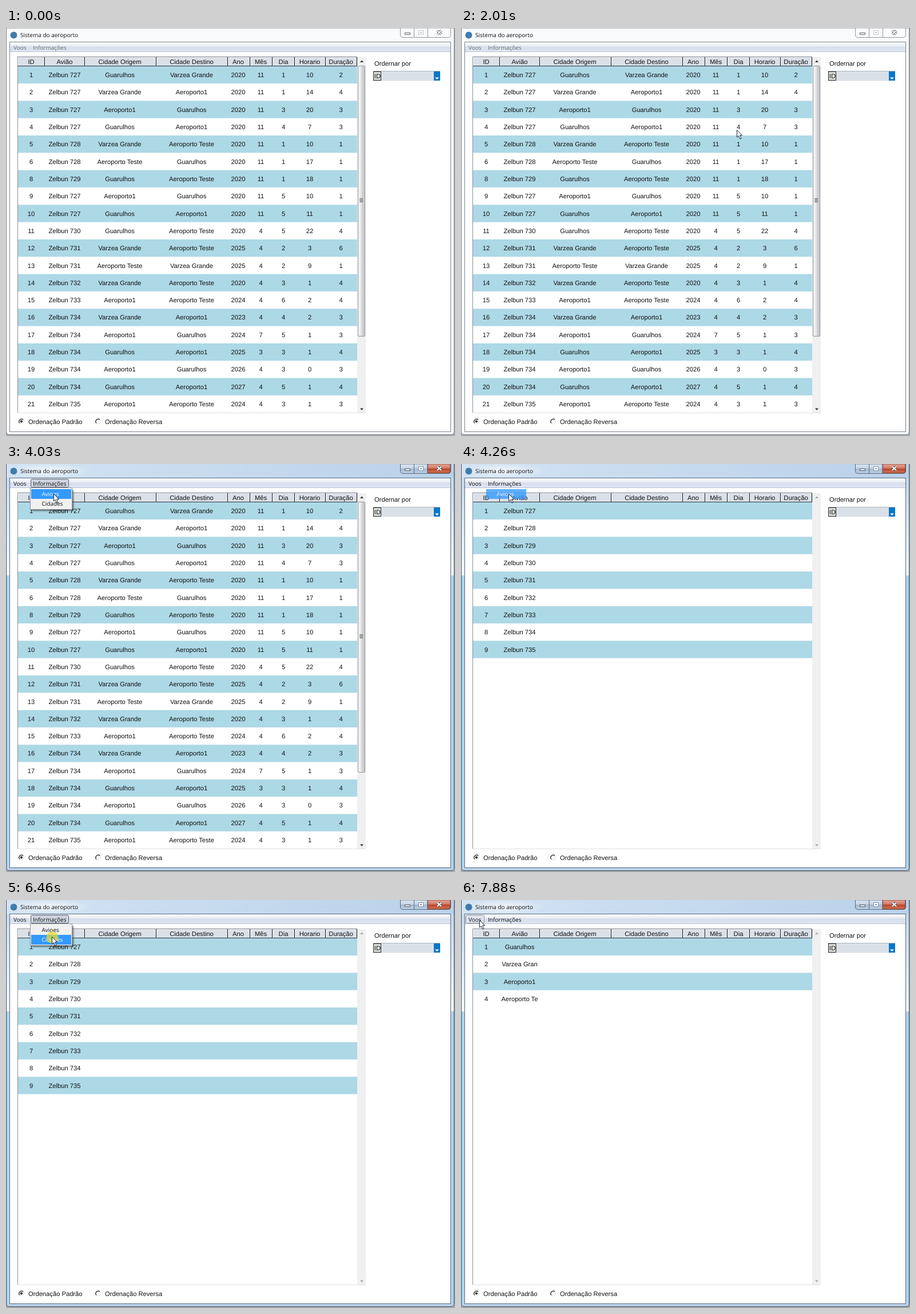
Animation, 785 px wide and 714 px high, one loop 8000 ms. Source, as an HTML page:

```html
<!DOCTYPE html>
<html lang="pt">
<head>
<meta charset="utf-8">
<title>Sistema do aeroporto</title>
<style>
html, body { margin: 0; width: 100%; height: 100%; overflow: hidden; background: #a4a9ae; }
svg { display: block; width: 785px; height: 714px; }
rect { shape-rendering: crispEdges; }
.round { shape-rendering: auto; }
text { font: 11.2px "Liberation Sans", Arial, sans-serif; fill: #111; text-rendering: geometricPrecision; }
.mid { text-anchor: middle; }
.ui { font: 10px "Open Sans", "Noto Sans", sans-serif; }
.timed { animation: 8s step-end infinite; }
</style>
</head>
<body>
<svg id="stage" viewBox="0 0 785 714">
  <defs>
    <linearGradient id="glass">
      <stop offset="0" stop-color="#d3e3f3"/><stop offset="1" stop-color="#b9d1ea"/>
    </linearGradient>
    <linearGradient id="side" x2="0" y2="1">
      <stop offset="0" stop-color="#c6d9ed"/><stop offset="1" stop-color="#f2f7fc"/>
    </linearGradient>
    <linearGradient id="bar" x2="0" y2="1">
      <stop offset="0" stop-color="#fff"/><stop offset=".45" stop-color="#e6ebf4"/>
      <stop offset=".5" stop-color="#d6ddeb"/><stop offset="1" stop-color="#e0e6f3"/>
    </linearGradient>
    <linearGradient id="button" x2="0" y2="1">
      <stop offset="0" stop-color="#dce7f3"/><stop offset=".48" stop-color="#c3d3e5"/>
      <stop offset=".5" stop-color="#a4b9d0"/><stop offset="1" stop-color="#bed2e8"/>
    </linearGradient>
    <linearGradient id="red" x2="0" y2="1">
      <stop offset="0" stop-color="#e6a595"/><stop offset=".48" stop-color="#d07863"/>
      <stop offset=".5" stop-color="#b8412a"/><stop offset="1" stop-color="#d4744f"/>
    </linearGradient>
    <linearGradient id="thumb">
      <stop offset="0" stop-color="#f6f6f6"/><stop offset=".48" stop-color="#e6e6e8"/>
      <stop offset=".55" stop-color="#d3d4d7"/><stop offset="1" stop-color="#c5c6ca"/>
    </linearGradient>
    <radialGradient id="glow">
      <stop offset="0" stop-color="#fff" stop-opacity=".75"/><stop offset="1" stop-color="#fff" stop-opacity="0"/>
    </radialGradient>
  </defs>
</svg>
<script>
const LOOP = 8000;
const css = [];
let timedCount = 0;

const rect = (x, y, w, h, fill, extra = '') =>
  `<rect x="${x}" y="${y}" width="${w}" height="${h}" fill="${fill}" ${extra}/>`;
const box = (x, y, w, h, fill, stroke, r = 0) =>
  rect(x + .5, y + .5, w - 1, h - 1, fill, `stroke="${stroke}" rx="${r}" class="round"`);
const path = (d, fill, stroke = 'none', extra = '') =>
  `<path d="${d}" fill="${fill}" stroke="${stroke}" ${extra}/>`;
const label = (x, y, str, cls = '', fill = '#111') =>
  `<text x="${x}" y="${y}" class="${cls}" style="fill:${fill}">${str}</text>`;

// Group whose style jumps at the given [ms, declarations] marks.
function timed(marks, content) {
  const name = 'k' + timedCount++;
  const frames = marks.map(([ms, rule]) => `${ms / LOOP * 100}%{${rule}}`).join('');
  css.push(`@keyframes ${name}{${frames}}`);
  return `<g class="timed" style="animation-name:${name}">${content}</g>`;
}

// Group visible only during the given [start, end] spans.
function shown(spans, content) {
  const marks = [];
  if (spans[0][0] > 0) marks.push([0, 'visibility:hidden']);
  for (const [start, end] of spans) {
    marks.push([start, 'visibility:visible']);
    marks.push([end, end < LOOP ? 'visibility:hidden' : 'visibility:visible']);
  }
  return timed(marks, content);
}

function windowFrame(active) {
  const line = active ? '#46525f' : '#7b8085';
  const buttonLine = active ? '#56687c' : '#8f979f';
  const glyph = active ? '#fff' : '#fafafa';
  const edge = active ? '#4b5664' : '#62666b';
  const button = active ? 'url(#button)' : '#fbfcfd';
  let out = path('M.5 0V706Q.5 711.5 6 711.5H778Q783.5 711.5 783.5 706V0Z', active ? '#bcd3ea' : '#fafbfc', line);
  if (active) {
    out += rect(1, 0, 782, 25, 'url(#glass)');
    for (const x of [1, 778]) out += rect(x, 25, 5, 170, 'url(#side)');
    for (const x of [1, 781]) out += rect(x, 195, 2, 511, '#8fd3f0');
    out += `<ellipse cx="76" cy="12" rx="72" ry="13" fill="url(#glow)"/>`;
  }
  out += path('M689.5 0V12Q689.5 16.5 694 16.5H773Q777.5 16.5 777.5 12V0Z', button, buttonLine);
  if (active) out += path('M737 0H777V12Q777 16 773 16H737Z', 'url(#red)', '#71372e');
  out += path('M713.5 0V16M737.5 0V16', 'none', buttonLine);
  out += rect(697.5, 8.5, 9, 3, glyph, `stroke="${edge}"`);
  const faint = active ? '#8296ad' : '#c3c8cd';
  out += rect(721.5, 4.5, 8, 7, glyph, `stroke="${faint}"`) + rect(724, 7, 3, 2, faint);
  const cross = 'M754 4.5L761 11M761 4.5L754 11';
  out += path(cross, 'none', edge, 'stroke-width="4"') + path(cross, 'none', glyph, 'stroke-width="2"');
  out += box(6, 24, 772, 683, '#fff', active ? '#56697e' : '#7d848c');
  out += rect(7, 25, 770, 16, 'url(#bar)') + rect(7, 41, 770, 1, '#bac2d1');
  return out;
}

const menuTitles = fill => label(13, 37.5, 'Voos', 'ui', fill) + label(47, 37.5, 'Informações', 'ui', fill);

const columns = [20, 67, 137, 262, 387, 426, 465, 504, 558, 613];
const centers = [44, 102.5, 199, 324.5, 406, 445.5, 485, 531, 585.5];
const titles = ['ID', 'Avião', 'Cidade Origem', 'Cidade Destino', 'Ano', 'Mês', 'Dia', 'Horario', 'Duração'];
const cities = { G: 'Guarulhos', V: 'Varzea Grande', A: 'Aeroporto1', T: 'Aeroporto Teste' };
const plane = number => 'Zelbun ' + number;

const ROW = 30.32;
const table = rows => rows.map((cells, i) =>
  (i % 2 ? '' : rect(21, 66.8 + ROW * i, 593, ROW, '#add8e6', 'class="round"')) +
  cells.map((cell, c) => label(centers[c], 86 + ROW * i, cell, 'mid')).join('')
).join('');

const flights = `727 G V 2020 11 1 10 2
727 V A 2020 11 1 14 4
727 A G 2020 11 3 20 3
727 G A 2020 11 4 7 3
728 V T 2020 11 1 10 1
728 T G 2020 11 1 17 1
729 G T 2020 11 1 18 1
727 A G 2020 11 5 10 1
727 G A 2020 11 5 11 1
730 G T 2020 4 5 22 4
731 V T 2025 4 2 3 6
731 T V 2025 4 2 9 1
732 V T 2020 4 3 1 4
733 A T 2024 4 6 2 4
734 V A 2023 4 4 2 3
734 A G 2024 7 5 1 3
734 G A 2025 3 3 1 4
734 A G 2026 4 3 0 3
734 G A 2027 4 5 1 4
735 A T 2024 4 3 1 3`.split('\n').map((line, i) => {
  const [number, from, to, ...rest] = line.split(' ');
  return [i < 6 ? i + 1 : i + 2, plane(number), cities[from], cities[to], ...rest];
});
const planes = Array.from({ length: 9 }, (_, i) => [i + 1, plane(727 + i)]);
const cityRows = Object.values(cities).map((city, i) => [i + 1, i % 2 ? city.slice(0, i > 2 ? 12 : 11) : city]);

function tableFrame() {
  let out = rect(20, 50, 594, 1, '#777c84') + rect(20, 50, 1, 624, '#8b9097') + rect(20, 673, 609, 1, '#dcdfe3');
  titles.forEach((title, i) => {
    const x = columns[i] + 1, w = columns[i + 1] - columns[i];
    out += rect(x, 51, w, 15, '#dae0e8') + rect(x, 51, w, 1, '#f7f9fb') + rect(x, 51, 1, 15, '#f7f9fb');
    out += rect(x, 66, w, 1, '#111') + rect(x + w - 1, 51, 1, 16, '#111');
    out += label(centers[i], 63, title, 'mid');
  });
  return out + rect(614, 51, 15, 622, '#f0f0f0');
}

const arrows = fill => path('M619 60H625L622 56.5ZM619 665.5H625L622 669Z', fill);
const scrollThumb = box(615, 66, 13, 474, 'url(#thumb)', '#92959a', 1.5) +
  [298, 300, 302, 304].map(y => rect(618, y, 6, 1, '#5f6368')).join('');

const radio = (x, checked) =>
  `<circle cx="${x}" cy="688.5" r="4.3" fill="#fff" stroke="#d8d8d8"/>` +
  path(`M${x - 3.1} 691.6A4.4 4.4 0 0 1 ${x + 3.1} 685.4`, 'none', '#333', 'stroke-width="1.4"') +
  (checked ? `<circle cx="${x}" cy="688.5" r="2" fill="#000"/>` : '');

const sidePanel = label(644, 66, 'Ordernar por') +
  rect(642, 76, 117, 16, '#dae0e8') + rect(642, 75, 117, 1, '#aeb3b9') + rect(642, 92, 117, 1, '#eef0f3') +
  box(642, 76, 14, 16, '#dfe3df', '#222') + label(643.8, 88, 'ID') +
  rect(748, 76, 11, 16, '#0878c9') + path('M750 86.5H757L753.5 90Z', '#fff');

const menuItem = (i, on) =>
  (on ? rect(44, 44 + 17 * i, 70, 17, '#3399ff') : '') +
  label(62.5, 56 + 17 * i, ['Avioes', 'Cidades'][i], 'ui', on ? '#fff' : '#111');
const popup = selected =>
  rect(46, 46, 74, 38, '#000', 'opacity=".12"') + rect(45, 45, 73, 37, '#000', 'opacity=".3"') +
  box(42, 41, 74, 39, '#f1f1f1', '#8d9198') + menuItem(0, selected === 0) + menuItem(1, selected === 1);
const fading = i => `<g opacity=".78">${menuItem(i, true)}</g>`;

const hover = (x, w) => box(x, 26, w, 15, '#dfe4ee', '#858f9e', 2);
const pressed = box(43, 26, 67, 15, '#ced4df', '#565f6e', 2);

const cursorPath = [
  [410, 747, 688], [610, 743, 650], [810, 735, 585], [1010, 720, 510], [1210, 697, 435], [1410, 664, 367],
  [1610, 610, 305], [1810, 548, 240], [2010, 482, 178], [2210, 370, 130], [2410, 245, 88], [2610, 139, 52],
  [2830, 100, 36], [3030, 90, 33], [3640, 88, 40], [3850, 85, 48], [4030, 83, 52], [4660, 82, 44],
  [4860, 79, 37], [5060, 78, 35], [5640, 78, 42], [5850, 79, 51], [6050, 80, 59], [6260, 80, 64],
  [7280, 72, 56], [7480, 60, 46], [7680, 46, 38], [7880, 32, 35]
];
const pointer = path('M.5 .5V13.2L3.4 10.6L5.8 16.2L8 15.3L5.6 9.7H9.6Z', '#fff', '#222b3a');
const click = '<circle cx="1" cy="1.5" r="10.5" fill="#e8dc28" opacity=".72"/>';
const cursor = timed(
  [[0, 'transform:translate(-50px,-50px)'], ...cursorPath.map(([ms, x, y]) => [ms, `transform:translate(${x}px,${y}px)`])],
  shown([[3430, 3640], [5240, 5440], [6460, 6660]], click) + pointer
);

const scene = [
  shown([[0, 3430]], windowFrame(false) + menuTitles('#6d6d6d')),
  shown([[3430, LOOP]], windowFrame(true)),
  '<circle cx="13.5" cy="12.5" r="6" fill="#3f7cac"/>',
  label(25, 16, 'Sistema do aeroporto', 'ui'),
  tableFrame(),
  shown([[0, 4260]], table(flights) + scrollThumb + arrows('#333')),
  shown([[4260, 6660]], table(planes)),
  shown([[6660, LOOP]], table(cityRows)),
  shown([[4260, LOOP]], arrows('#a5a8ac')),
  sidePanel,
  radio(27, true), label(39, 693, 'Ordenação Padrão'),
  radio(161, false), label(173, 693, 'Ordenação Reversa'),
  shown([[4860, 5440], [7480, 7880]], hover(43, 67)),
  shown([[3430, 4260], [5440, 6660]], pressed),
  shown([[7880, LOOP]], hover(8, 33)),
  shown([[3430, LOOP]], menuTitles('#111')),
  shown([[3430, 3850], [5440, 5850]], popup()),
  shown([[3850, 4260], [5850, 6260]], popup(0)),
  shown([[6260, 6660]], popup(1)),
  shown([[4260, 4460]], fading(0)),
  shown([[6660, 6890]], fading(1)),
  cursor
];

document.getElementById('stage').insertAdjacentHTML('beforeend', scene.join(''));
document.head.insertAdjacentHTML('beforeend', `<style>${css.join('')}</style>`);
</script>
</body>
</html>
```
